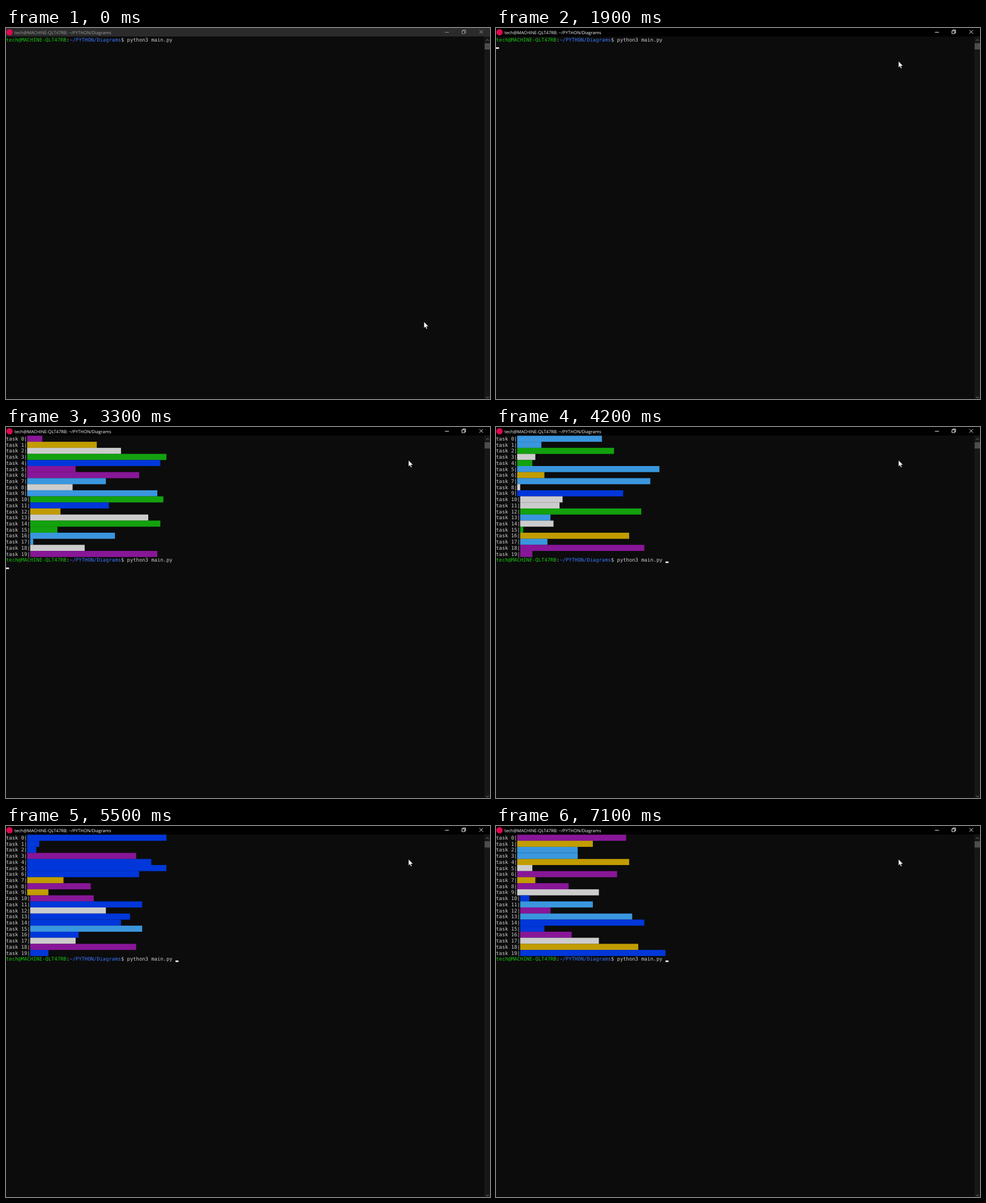
Animation, 854 px wide and 656 px high, one loop 7.2 s. Source, as an HTML page:

```html
<!DOCTYPE html>
<html lang="en">
<head>
<meta charset="utf-8">
<title>Terminal bar chart</title>
<style>
  html, body { margin: 0; width: 100%; height: 100%; overflow: hidden; background: #0c0c0c; }
  svg { display: block; width: 854px; height: 656px; }
  text { white-space: pre; text-rendering: geometricPrecision; }
  .mono { font: 8.87px "DejaVu Sans Mono", monospace; fill: #ccc; }
  .title { font: 7.7px "Open Sans", sans-serif; }
</style>
</head>
<body>
<svg id="stage" viewBox="0 0 854 656"></svg>
<script>
const LOOP = 7200, STEP = 100;
const COL = 5.34, ROW = 10.72, TOP = 15.4;
const HOST = 'tech@MACHINE-QLT47RB', DIR = '~/PYTHON/Diagrams', CMD = 'python3 main.py';
const COLORS = { P: '#881798', Y: '#c19c00', W: '#cccccc', G: '#13a10e', B: '#0037da', C: '#3a96dd' };

// One entry per task: colour letter and length in characters.
const CHARTS = [
  'P5 Y23 W31 G46 B44 P16 P37 C26 W15 C43 G44 B26 Y10 W39 G43 G9 C28 C1 W18 P42',
  'C28 C8 G32 W6 G5 C47 Y9 C44 W1 B35 W14 W13 G40 C10 W11 G1 Y36 C9 P41 P4',
  'B46 B4 B3 P36 B41 B46 B37 Y12 P21 Y7 P21 B37 W25 B33 B30 C37 B16 W15 P35 B6',
  'P36 Y25 C20 C20 Y37 W5 P33 Y6 P17 W27 B3 C24 P10 C37 B41 B8 P17 W26 Y39 B48'
].map(line => line.split(' '));

// Times of Enter, of the finished chart and of the recalled command.
const RUNS = [
  { enter: 1900, draw: 2000, recall: 2700 },
  { enter: 3300, draw: 3400, recall: 3900 },
  { enter: 4700, draw: 4700, recall: 5500 },
  { enter: 5900, draw: 6000, recall: 6700 }
];

const POINTER = [
  { t: 0, x: 737.5, y: 519.5 },
  { t: 800, x: 472.3, y: 132.8 },
  { t: 1400, x: 710.2, y: 58.8 }
];

const stage = document.getElementById('stage');

function add(parent, tag, attrs, content) {
  const el = document.createElementNS('http://www.w3.org/2000/svg', tag);
  for (const key in attrs) el.setAttribute(key, attrs[key]);
  if (content) el.textContent = content;
  parent.appendChild(el);
  return el;
}

const rect = (parent, x, y, width, height, fill) =>
  add(parent, 'rect', { x, y, width, height, fill });
const rowY = row => TOP + row * ROW;
const write = (parent, col, row, content, fill) =>
  add(parent, 'text', { class: 'mono', x: col * COL, y: rowY(row) + 8.5, style: fill ? `fill:${fill}` : '' }, content);
const show = (el, on) => el.setAttribute('visibility', on ? 'visible' : 'hidden');

function makeChart(bars) {
  const group = add(stage, 'g', {});
  bars.forEach((bar, i) => {
    const label = `task ${i}|`;
    write(group, 0, i, label);
    rect(group, label.length * COL, rowY(i), bar.slice(1) * COL, ROW + 0.05, COLORS[bar[0]]);
  });
  return group;
}

rect(stage, 0, 0, 854, 656, '#0c0c0c');
const charts = CHARTS.map(makeChart);

const prompt = add(stage, 'g', {});
write(prompt, 0, 0, HOST, '#16c60c');
write(prompt, 20, 0, ':');
write(prompt, 21, 0, DIR, '#3b78ff');
write(prompt, 38, 0, '$');
const command = write(prompt, 40, 0, CMD);
const cursor = rect(stage, 0, 0, COL, 2.7, '#f2f2f2');

// Scroll bar
rect(stage, 844, 15, 10, 641, '#171717');
rect(stage, 844.5, 27, 9.5, 11, '#4d4d4d');
add(stage, 'path', { d: 'M847 22.7l2.5-2.5 2.5 2.5M847 651.8l2.5 2.5 2.5-2.5', fill: 'none', stroke: '#858585' });

// Title bar
const bar = rect(stage, 0, 0, 854, 15, '#000');
add(stage, 'circle', { cx: 6.2, cy: 7.5, r: 5.5, fill: '#e0094f' });
const title = add(stage, 'text', { class: 'title', x: 15, y: 10.6 }, `${HOST}: ${DIR}`);
const buttons = add(stage, 'path', {
  d: 'M774.5 7.5h7M804.5 5h5v5h-5zM806 5v-1.5h5v5h-1.5M835.3 3.7l6.4 6.4M841.7 3.7l-6.4 6.4',
  fill: 'none', 'stroke-width': 0.9
});

const pointer = add(stage, 'path', {
  d: 'M0 0V11.2l2.5-2.4 1.7 4 1.8-.8-1.7-3.8h3.7z',
  fill: '#fff', stroke: '#000', 'stroke-width': 0.5
});

function pointerAt(t) {
  const next = POINTER.findIndex(p => p.t > t);
  if (next < 0) return POINTER[POINTER.length - 1];
  const a = POINTER[next - 1], b = POINTER[next];
  const k = (t - a.t) / (b.t - a.t), e = k * k * (3 - 2 * k);
  return { x: a.x + (b.x - a.x) * e, y: a.y + (b.y - a.y) * e };
}

function render(time) {
  const t = Math.floor((time % LOOP) / STEP) * STEP;

  const active = t >= 500;
  bar.setAttribute('fill', active ? '#000' : '#2b2b2b');
  title.setAttribute('fill', active ? '#fff' : '#a0a0a0');
  buttons.setAttribute('stroke', active ? '#fff' : '#a0a0a0');

  const shown = RUNS.filter(run => t >= run.draw).length - 1;
  charts.forEach((chart, i) => show(chart, i === shown));

  const row = shown < 0 ? 0 : 20;
  const typed = shown < 0 || t >= RUNS[shown].recall;
  const running = RUNS.some(run => t >= run.enter && t < run.draw);
  prompt.setAttribute('transform', `translate(0 ${row * ROW})`);
  show(command, typed);

  const col = running ? 0 : typed ? 56 : 40;
  cursor.setAttribute('x', col * COL);
  cursor.setAttribute('y', rowY(row + (running ? 1 : 0)) + 8);
  show(cursor, t >= RUNS[0].enter);

  const p = pointerAt(t);
  pointer.setAttribute('transform', `translate(${p.x} ${p.y})`);
}

const start = performance.now();
function tick() {
  render(performance.now() - start);
  requestAnimationFrame(tick);
}
tick();
</script>
</body>
</html>
```
